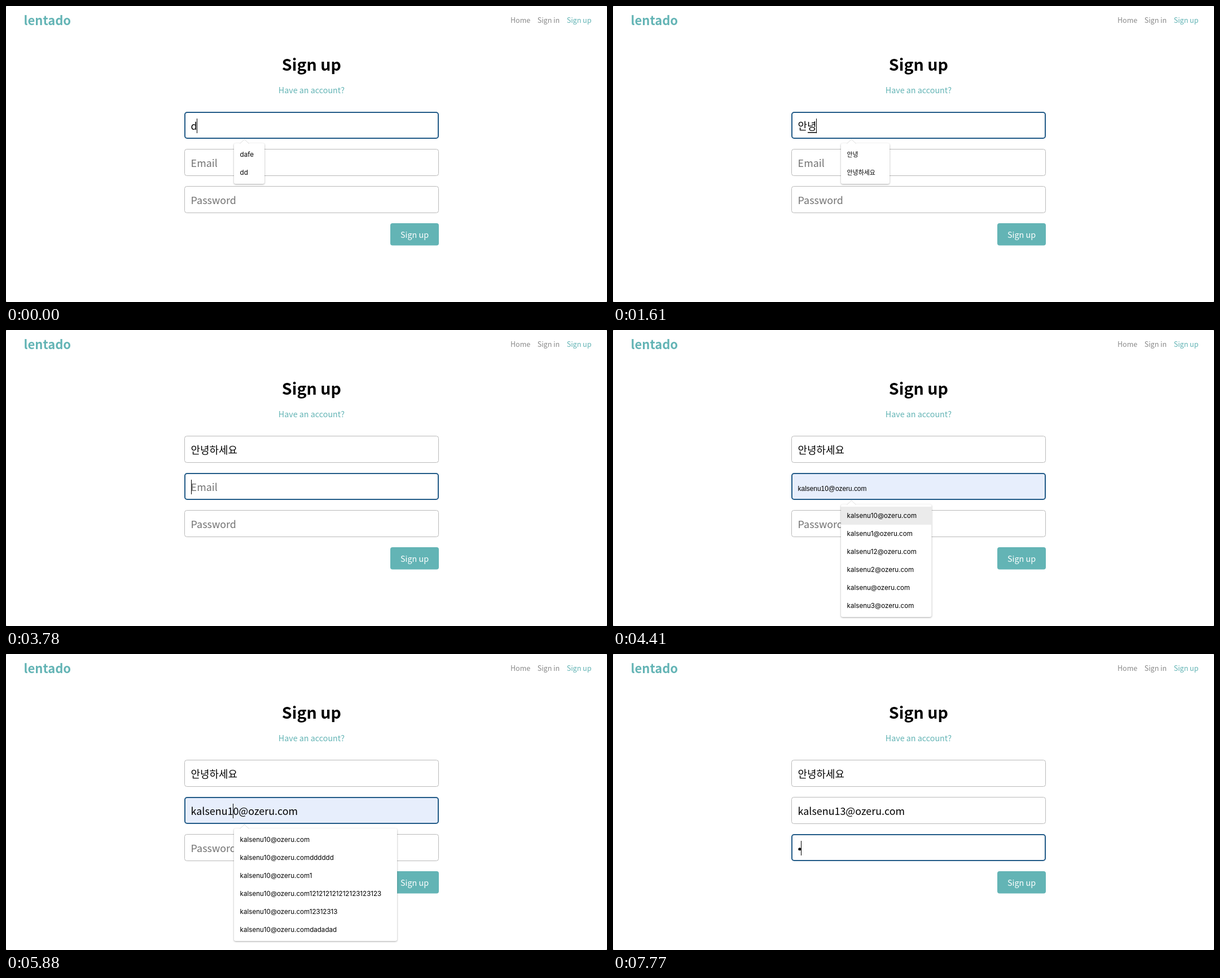
These frames come from a looping animation (1065x526 px, 8000 ms). An HTML page with a canvas:

```html
<!DOCTYPE html>
<html lang="ko">
<head>
<meta charset="utf-8">
<title>Sign up</title>
<style>
  html, body { margin: 0; width: 100%; height: 100%; overflow: hidden; background: #fff; }
  canvas { display: block; }
</style>
</head>
<body>
<canvas id="stage" width="1065" height="526"></canvas>
<script>
const ctx = document.getElementById('stage').getContext('2d');
const LOOP = 8000;
const TEAL = '#63b4b5', GREY = '#8a8a8a', HINT = '#727272', BLACK = '#000';
const PAGE = '"Noto Sans CJK KR", "Noto Sans CJK JP", "Noto Sans CJK", sans-serif';
const MENU = 'Inter, "Noto Sans CJK KR", sans-serif';
const SYLLABLE = 16.47, TEXT_X = 327.6;
const fieldTop = row => 188 + 66 * row;

const USER = 'kalsenu', HOST = '@ozeru.com';
const address = digits => USER + digits + HOST;
const latin = { width: 54, items: ['dafe', 'dd'] };
const hello = { width: 86, items: ['안녕', '안녕하세요'], korean: true };
const helloLong = { width: 86, items: ['안녕하세요'], korean: true };
const accounts = { width: 160.5, items: ['10', '1', '12', '2', '', '3'].map(address) };
const variants = {
  width: 289,
  items: ['', 'dddddd', '1', '121212121212123123123', '12312313', 'dadadad'].map(end => address('10') + end)
};

// Each step changes only the listed parts of the form state.
const steps = [
  [0, { row: 0, name: 'd', email: '', bullet: false, caret: 338, composing: -1,
        menu: latin, filled: false, preview: false }],
  [210, { caret: 0 }],
  [350, { name: 'ㅇ', caret: 344, composing: 0 }],
  [420, { menu: null }],
  [700, { name: '아' }],
  [770, { name: '안', menu: hello }],
  [1330, { name: '안ㄴ', caret: 360, composing: 1, menu: null }],
  [1470, { name: '안녀' }],
  [1540, { name: '안녕' }],
  [1610, { menu: hello }],
  [1750, { name: '안녕ㅎ', caret: 377, composing: 2, menu: null }],
  [1960, { name: '안녕하' }],
  [2100, { name: '안녕하ㅅ', caret: 393, composing: 3, menu: helloLong }],
  [2240, { name: '안녕하세', menu: null }],
  [2450, { name: '안녕하세요', caret: 410, composing: 4 }],
  [2730, { row: 1, caret: 328, composing: -1 }],
  [3220, { caret: 0 }],
  [3780, { caret: 328 }],
  [3850, { menu: accounts }],
  [4340, { caret: 0 }],
  [4410, { email: address('10'), filled: true, preview: true }],
  [4830, { preview: false, caret: 515 }],
  [4900, { menu: null }],
  [5530, { caret: 0 }],
  [5880, { caret: 402, menu: variants }],
  [6440, { caret: 0 }],
  [6650, { caret: 411 }],
  [7070, { email: address('1'), caret: 402, filled: false, menu: null }],
  [7210, { email: address('13'), caret: 411 }],
  [7490, { row: 2, caret: 328 }],
  [7770, { bullet: true, caret: 333 }]
];

function stateAt(time) {
  const state = {};
  for (const [start, change] of steps) if (start <= time) Object.assign(state, change);
  return state;
}

function text(string, x, y, size, color, { weight = 400, family = PAGE, align = 'left' } = {}) {
  ctx.font = `${weight} ${size}px ${family}`;
  ctx.textAlign = align;
  ctx.fillStyle = color;
  ctx.fillText(string, x, y);
}

function box(x, y, w, h, radius) {
  ctx.beginPath();
  ctx.roundRect(x, y, w, h, radius);
}

function drawPage() {
  ctx.fillStyle = '#fff';
  ctx.fillRect(0, 0, 1065, 526);
  ctx.fillStyle = '#aaa';
  for (const x of [0, 1064]) for (const y of [0, 525]) ctx.fillRect(x, y, 1, 1);

  text('lentado', 31.6, 34, 22, TEAL, { weight: 900 });
  text('Home', 894, 30, 12.53, GREY);
  text('Sign in', 941.7, 30, 12.53, GREY);
  text('Sign up', 993.7, 30, 12.53, TEAL);
  text('Sign up', 541.4, 115, 28.64, BLACK, { weight: 700, align: 'center' });
  text('Have an account?', 541.4, 155, 14.32, TEAL, { align: 'center' });

  box(681, 386, 86, 39.5, 4);
  ctx.fillStyle = TEAL;
  ctx.fill();
  text('Sign up', 724, 412, 14.32, '#fff', { align: 'center' });
}

function drawField(row, focused, filled) {
  const inset = focused ? 1 : 0.5;
  box(316 + inset, fieldTop(row) + inset, 451 - 2 * inset, 48 - 2 * inset, 4);
  ctx.fillStyle = filled ? '#e7eefc' : '#fff';
  ctx.fill();
  ctx.lineWidth = 2 * inset;
  ctx.strokeStyle = focused ? '#215a87' : '#b9b9b9';
  ctx.stroke();
}

function drawValue(row, value, hint) {
  text(value || hint, TEXT_X, fieldTop(row) + 32, 17.9, value ? BLACK : HINT);
}

function drawForm(state) {
  for (let row = 0; row < 3; row++) drawField(row, row === state.row, row === 1 && state.filled);

  drawValue(0, state.name, '');
  if (state.preview) {
    text(state.email, TEXT_X, 286, 11.9, BLACK, { family: '"Liberation Sans", Arial, sans-serif' });
  } else {
    drawValue(1, state.email, 'Email');
  }

  if (state.bullet) {
    ctx.fillStyle = BLACK;
    ctx.beginPath();
    ctx.arc(330.8, 346.8, 2.5, 0, 2 * Math.PI);
    ctx.fill();
  } else {
    drawValue(2, '', 'Password');
  }

  ctx.fillStyle = BLACK;
  if (state.composing >= 0) {
    ctx.fillRect(Math.round(TEXT_X + SYLLABLE * state.composing) + 1, 224, 15, 1.5);
  }
  if (state.caret) ctx.fillRect(state.caret, fieldTop(state.row) + 12, 1, 26);
}

function drawMenu({ width, items, korean }, row, highlight) {
  const left = 404, top = fieldTop(row) + 56, height = 8 + 32 * items.length;

  ctx.save();
  ctx.shadowColor = 'rgba(0, 0, 0, 0.35)';
  ctx.shadowBlur = 3;
  ctx.shadowOffsetY = 1;
  box(left, top, width, height, 3);
  ctx.fillStyle = '#fff';
  ctx.fill();
  ctx.restore();

  ctx.beginPath();
  ctx.moveTo(414.5, top + 0.5);
  ctx.lineTo(422.5, top - 7);
  ctx.lineTo(430.5, top + 0.5);
  ctx.fillStyle = '#fff';
  ctx.fill();
  ctx.lineWidth = 1;
  ctx.strokeStyle = '#dedede';
  ctx.stroke();

  if (highlight) {
    ctx.fillStyle = '#ebebeb';
    ctx.fillRect(left, top + 4, width, 32);
  }
  items.forEach((item, i) => {
    const family = korean ? PAGE : MENU;
    text(item, 414.6, top + 24 + 32 * i, korean ? 10.9 : 11.6, BLACK, { family });
  });
}

function frame(now) {
  const state = stateAt(now % LOOP);
  drawPage();
  drawForm(state);
  if (state.menu) drawMenu(state.menu, state.row, state.preview);
  requestAnimationFrame(frame);
}

frame(0);
</script>
</body>
</html>
```
